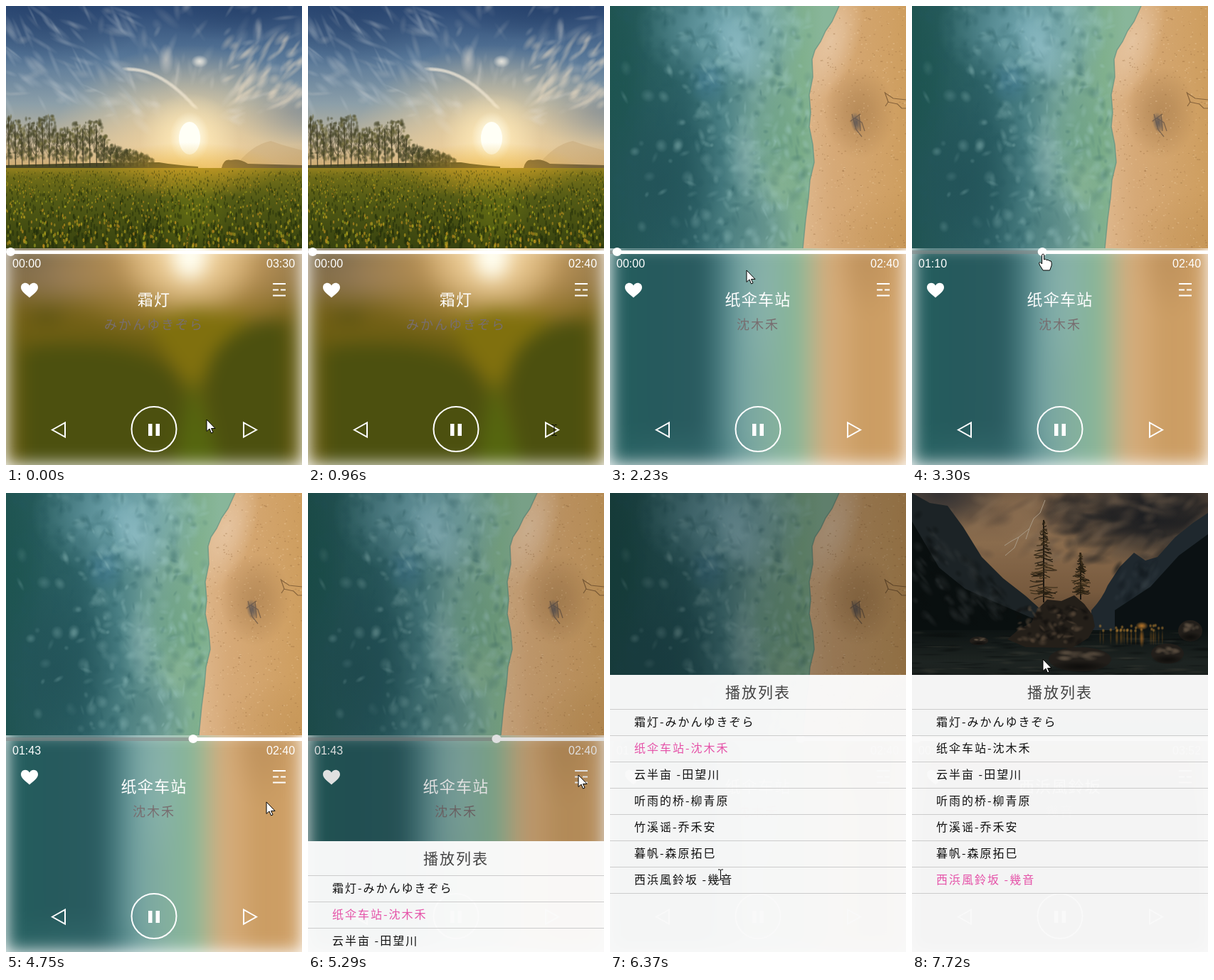
Animation, 416 px wide and 646 px high, one loop 8000 ms. Source, as an HTML page with a canvas:

```html
<!DOCTYPE html>
<html lang="zh">
<head>
<meta charset="utf-8">
<title>Music player</title>
<style>
html, body { margin: 0; width: 100%; height: 100%; overflow: hidden; background: #fff; }
#stage { position: relative; width: 416px; height: 646px; overflow: hidden;
  font-family: "Noto Sans CJK SC", "Noto Sans CJK", sans-serif; font-weight: 300; }
#stage > * { position: absolute; left: 0; top: 0; }
#stage > p { margin: 0; width: 416px; text-align: center; white-space: nowrap; line-height: 30px; }
#stage > .time { width: auto; color: #fff; font: 16px/20px Arial, "Liberation Sans", sans-serif; top: 353px; }
#now { left: 9px; }
#stage > #total { left: 366px; }
#stage > #title { top: 396px; color: #fff; font-size: 22px; letter-spacing: 1.2px; }
#stage > #artist { top: 432px; color: #786e70; font-size: 18px; letter-spacing: 2px; }
#dim { width: 416px; height: 646px; background: #000; }
#list { width: 416px; height: 390px; background: rgba(251, 251, 251, .967); color: #111; }
#list div { box-sizing: border-box; height: 37px; padding-left: 34px; border-bottom: 1px solid #ccc;
  font-size: 16px; line-height: 33px; letter-spacing: 2px; white-space: pre; }
#list .head { height: 49px; padding: 0; text-align: center; font-size: 21px; line-height: 46px; color: #444; }
#list .on { color: #e552a8; }
</style>
</head>
<body>
<div id="stage">
  <svg id="ui" width="416" height="646" fill="none" stroke="#fff" stroke-width="2">
    <path d="M0 346.5H416" stroke="#888" stroke-opacity=".55" stroke-width="5"/>
    <path id="rest" stroke-width="5"/>
    <ellipse id="thumb" cy="346" rx="6.5" ry="6" fill="#fff" stroke="none"/>
    <path d="M33 410.5C27 405 21 401.5 21 396C21 389 30 387.5 33 393.5C36 387.5 45 389 45 396C45 401.5 39 405 33 410.5Z" fill="#fff" stroke="none"/>
    <path d="M375 391H393M375 399.5H383M386 399.5H393M375 407.5H393"/>
    <path d="M65 596.5L83 586.5V606.500ZM352 596.500L334 586.500V606.500Z"/>
    <circle cx="208" cy="595.500" r="31.500"/>
    <path d="M200 588h5.500v17h-5.500zM210.500 588h5.500v17h-5.500z" fill="#fff" stroke="none"/>
  </svg>
  <p class="time" id="now"></p>
  <p class="time" id="total"></p>
  <p id="title"></p>
  <p id="artist"></p>
  <div id="dim"></div>
  <div id="list"><div class="head">播放列表</div></div>
  <svg width="416" height="646"><path id="cursor" stroke="#000" stroke-linejoin="round"/></svg>
</div>
<script>
const W = 416, H = 646, PHOTO = 341, TAU = Math.PI * 2;
const $ = id => document.getElementById(id);

const songs = [
  ['霜灯', 'みかんゆきぞら', '03:30'],
  ['纸伞车站', '沈木禾', '02:40'],
  ['云半亩 ', '田望川', '03:12'],
  ['听雨的桥', '柳青原', '03:48'],
  ['竹溪谣', '乔禾安', '04:05'],
  ['暮帆', '森原拓巳', '03:26'],
  ['西浜風鈴坂 ', '幾音', '03:52'],
];

// ---- drawing helpers, all on the current context g ----
let g, seed = 7;
const rnd = (a = 0, b = 1) => {
  seed = (seed * 16807) % 2147483647;
  return a + (b - a) * seed / 2147483647;
};
const newCanvas = () => Object.assign(document.createElement('canvas'), { width: W, height: H });
const stops = (gr, list) => { list.forEach(([p, c]) => gr.addColorStop(p, c)); return gr; };
const linear = (x0, y0, x1, y1, list) => stops(g.createLinearGradient(x0, y0, x1, y1), list);
const radial = (x, y, r, list) => stops(g.createRadialGradient(x, y, 0, x, y, r), list);
const rect = (x, y, w, h, fill) => { g.fillStyle = fill; g.fillRect(x, y, w, h); };
const shape = (d, fill) => { g.fillStyle = fill; g.fill(new Path2D(d)); };
const line = (d, color, width) => { g.strokeStyle = color; g.lineWidth = width; g.stroke(new Path2D(d)); };
const oval = (x, y, rx, ry, fill) => {
  g.fillStyle = fill; g.beginPath(); g.ellipse(x, y, rx, ry, 0, 0, TAU); g.fill();
};
function blob(x, y, rx, ry, rgb, a, turn = 0) {
  g.save();
  g.translate(x, y); g.rotate(turn); g.scale(rx, ry);
  rect(-1, -1, 2, 2, radial(0, 0, 1, [[0, `rgba(${rgb},${a})`], [.4, `rgba(${rgb},${a * .7})`], [1, `rgba(${rgb},0)`]]));
  g.restore();
}
const many = (n, f) => { for (let i = 0; i < n; i++) f(i); };

// ---- sunny field ----
function tree(x, h) {
  const y = 226;
  line(`M${x} ${y}L${x + rnd(-2, 2)} ${y - h * .9}`, 'rgba(56,52,34,.8)', 1.3);
  many(14, () => {
    const from = y - h * rnd(.2, .7), dx = rnd(-9, 9);
    line(`M${x} ${from}q${dx * .6} -4 ${dx} ${-h * rnd(.12, .3)}`, 'rgba(60,56,36,.5)', .7);
  });
  many(45, () => {
    const k = rnd(.15, 1), half = 11 * Math.sin(Math.PI * k ** .8 * .92) + 2;
    blob(x + rnd(-half, half), y - h * k, rnd(1.5, 4), rnd(2, 5), rnd() < .7 ? '66,66,36' : '105,100,50', .6);
  });
}
function field() {
  rect(0, 0, W, 230, linear(0, 0, 0, 230, [[0, '#2b4874'], [.3, '#557597'], [.6, '#8c9fa9'], [.85, '#c9b898'], [1, '#d2ab6c']]));
  blob(60, 20, 130, 70, '34,60,100', .45);
  blob(330, 5, 130, 45, '34,60,100', .5);
  blob(400, 150, 90, 45, '112,124,138', .6);
  blob(258, 185, 190, 130, '252,218,160', .8);
  many(170, () => {
    const a = rnd(-2.9, -.3), d = rnd(60, 290);
    blob(258 + d * Math.cos(a), 185 + d * Math.sin(a), rnd(8, 26), rnd(3, 8), '232,226,216', rnd(.06, .22), a + rnd(-.8, .8));
  });
  many(60, () => blob(rnd(0, 180), rnd(5, 140), rnd(10, 32), rnd(2, 6), '200,208,214', .22, rnd(.3, 1.2)));
  many(55, () => blob(rnd(310, 416), rnd(45, 140), rnd(8, 26), rnd(3, 8), '246,226,198', .32, rnd(-1.1, -.4)));
  many(14, i => blob(172 + i * 7, 89 + i * i * .3, 10, 3.5, '255,243,224', .6, .15 + i * .04));
  blob(272, 78, 12, 9, '255,248,235', .8);
  blob(225, 75, 11, 22, '235,225,212', .5);
  blob(258, 188, 70, 65, '255,236,188', .9);
  shape('M320 228Q345 195 372 190Q395 198 416 203V228Z', 'rgba(190,156,104,.35)');
  blob(258, 185, 28, 36, '255,255,240', 1);
  oval(258, 186, 15, 23, '#fffff6');
  shape('M303 228Q306 214 316 217Q328 214 340 222L416 224V229H303Z', '#75623a');
  shape('M0 232V224L120 221L215 220Q240 224 270 226V232Z', '#4a4826');
  many(21, i => tree(4 + i * 9.5, (i < 14 ? 70 : 45 - (i - 14) * 5) * rnd(.75, 1.08)));
  rect(0, 228, W, 114, linear(0, 228, 0, 341, [[0, '#93801f'], [.12, '#6f6c18'], [.4, '#525a15'], [1, '#38430f']]));
  blob(258, 232, 130, 40, '235,175,40', .5);
  blob(262, 290, 55, 70, '130,140,20', .35);
  many(2000, () => {
    const d = rnd() ** 1.4, y = 232 + d * 109, s = .6 + d * 1.7, x = rnd(0, W), bright = rnd() < .45;
    oval(x, y, s * (bright ? .7 : .7), s * (bright ? 1.3 : 2.2), bright ? `rgba(${rnd(150, 205)},${rnd(135, 168)},30,.65)` : 'rgba(32,44,10,.5)');
  });
}
function fieldBlur() {
  rect(0, 335, W, 311, linear(0, 341, 0, 480, [[0, '#7b6a4c'], [.35, '#7f6a40'], [.65, '#766218'], [1, '#685c10']]));
  blob(75, 385, 90, 40, '158,130,100', .55);
  blob(258, 345, 215, 130, '216,166,92', 1);
  blob(258, 348, 105, 95, '250,224,176', 1);
  oval(258, 352, 24, 32, '#fffef0');
  shape('M195 445L262 545L345 435L262 425Z', '#80700e');
  shape('M22 646V490Q28 472 130 478Q250 490 252 560L236 646Z', '#4c500f');
  shape('M396 646V445Q350 435 310 470Q276 500 280 555L300 646Z', '#4c500f');
  shape('M262 520L236 646H302Z', '#55660f');
  oval(56, 437, 26, 9, '#5c5312');
}

// ---- aerial shore ----
function shore() {
  rect(0, 0, W, PHOTO, linear(0, 0, 300, 0, [[0, '#1f5451'], [.35, '#2d6267'], [.52, '#487e83'], [.7, '#75a39b'], [.9, '#80b08d'], [1, '#88b69a']]));
  blob(160, 30, 125, 90, '122,174,184', .75);
  blob(70, 250, 105, 150, '34,82,88', .85);
  blob(15, 110, 40, 110, '28,84,80', .6);
  blob(138, 105, 30, 35, '66,122,148', .6);
  blob(235, 190, 60, 100, '104,158,122', .5);
  blob(190, 310, 70, 60, '72,122,122', .6);
  many(700, () => {
    const x = rnd(10, 280), light = rnd() < x / 360;
    blob(x, rnd(0, PHOTO), rnd(2, 11), rnd(3, 13), light ? '165,208,206' : '34,86,92', rnd(.1, .3), rnd(-.6, .6));
  });
  blob(180, 60, 32, 60, '170,212,222', .45, -.4);
  blob(190, 210, 22, 60, '160,196,196', .45);
  blob(240, 250, 30, 40, '150,190,150', .4);
  const edge = 'M322 0L312 22L303 35L296 50L288 62L284 75L285 100L280 125L282 150L280 170L285 195L287 220L281 245L279 270L275 300L271 341';
  g.save();
  g.clip(new Path2D(edge + 'H416V0Z'));
  rect(260, 0, 156, PHOTO, linear(270, 0, W, 0, [[0, '#deb78c'], [.3, '#d6a977'], [1, '#ce9e5f']]));
  blob(310, 50, 40, 90, '234,204,172', .75, .3);
  blob(350, 150, 50, 65, '165,122,74', .6);
  blob(400, 330, 100, 70, '190,142,80', .4);
  many(700, () => oval(rnd(275, W), rnd(0, PHOTO), rnd(.4, 1.6), rnd(.4, 1.1), rnd() < .5 ? 'rgba(140,98,54,.3)' : 'rgba(240,208,165,.35)'));
  line('M340 152l6 22l8 10M344 158l10 6l4 12M338 162l14 -10M350 152l2 24', 'rgba(100,82,68,.7)', 1.3);
  blob(346, 164, 8, 15, '92,86,86', .9, -.2);
  line('M386 121l5 14l-4 6M386 122l12 8l18 2M390 135l14 3l6 6l6 0', 'rgba(118,86,50,.8)', 1.2);
  g.restore();
  line(edge, 'rgba(95,145,130,.7)', 1.5);
}
function shoreBlur() {
  rect(0, 335, W, 311, linear(0, 0, W, 0, [[0, '#246060'], [.12, '#255a5c'], [.31, '#2a5b60'], [.37, '#477a7e'], [.44, '#75a3a2'], [.54, '#84af9f'], [.62, '#86b598'], [.67, '#a5b792'], [.71, '#cbae82'], [.76, '#d6ab78'], [.86, '#ca9c62'], [1, '#d0a168']]));
  blob(215, 400, 35, 130, '150,188,190', .35);
  blob(360, 350, 50, 90, '178,134,84', .5);
  blob(90, 640, 140, 50, '60,120,120', .4);
}

// ---- stormy lake ----
function spruce(x, top, bottom, half) {
  line(`M${x} ${top}V${bottom}`, '#2a2118', 2);
  many(110, () => {
    const k = rnd(), w = half * (.1 + .9 * Math.min(1, k * 1.5)) * rnd(.2, 1), side = rnd() < .5 ? -1 : 1;
    const y = top + (bottom - top - 8) * k;
    line(`M${x} ${y}q${side * w * .6} ${rnd(0, 4)} ${side * w} ${rnd(-1, 5)}`, rnd() < .6 ? '#372c1a' : '#5a4628', 1.2);
  });
}
function lake() {
  rect(0, 0, W, 200, linear(0, 0, 0, 200, [[0, '#a68362'], [.35, '#c59a6e'], [.7, '#aa8058'], [1, '#6c543e']]));
  blob(40, 0, 90, 55, '72,70,72', 1);
  blob(345, 25, 150, 85, '42,44,48', 1);
  blob(330, 35, 95, 50, '42,44,48', .8);
  blob(225, 25, 45, 35, '92,80,70', .8);
  blob(150, 30, 40, 40, '205,162,118', .6);
  many(110, () => blob(rnd(190, 416), rnd(0, 95), rnd(10, 32), rnd(5, 13), rnd() < .55 ? '40,42,46' : '150,126,102', .35, rnd(-.9, .3)));
  many(45, () => blob(rnd(30, 210), rnd(0, 90), rnd(10, 32), rnd(5, 12), rnd() < .5 ? '110,90,76' : '210,172,130', .25, rnd(-.9, .3)));
  line('M187 10L180 28L171 36L165 50L150 62L144 77L131 88M165 50L160 65M150 62L139 68L130 74', '#f0dcc0', 1);
  shape('M252 165Q268 148 275 130L292 104L312 84L328 95L345 90L370 62L395 42L416 28V200H252Z', '#2c3942');
  many(30, () => blob(rnd(285, 345), rnd(100, 150), rnd(3, 9), rnd(5, 16), rnd() < .5 ? '70,84,92' : '22,32,38', .4, .5));
  shape('M285 165L335 132L375 88L416 58V200H285Z', '#10191b');
  shape('M0 0L25 14L50 18L72 48L98 90L128 120L160 145L190 172V202H0Z', '#283236');
  shape('M0 40L38 105L75 135L120 155L178 180V205H0Z', '#0d1515');
  many(120, () => { const x = rnd(0, 135); blob(x, rnd(20 + x * .9, 180), rnd(3, 9), rnd(5, 18), rnd() < .6 ? '12,18,18' : '74,82,84', .35, -.7); });
  rect(0, 193, W, 150, linear(0, 193, 0, 341, [[0, '#131c1b'], [.3, '#2a3330'], [1, '#121919']]));
  many(140, () => blob(rnd(0, W), rnd(196, 260), rnd(10, 32), rnd(1, 3), rnd() < .4 ? '78,80, 70' : '10,15,15', .4));
  many(24, () => { const x = rnd(258, 360); blob(x, 190 + rnd(-4, 4), 2.5, 3, '255,180,70', .7); blob(x, 203, 1.5, 12, '180,120,40', .4); });
  blob(323, 187, 9, 6, '255,165,60', 1);
  blob(323, 204, 4, 14, '230,145,50', .7);
  shape('M134 206L150 192L168 182L176 164L190 150L210 152L228 144L242 156L254 172L257 188L248 204L225 218L160 217Z', '#332c24');
  many(90, () => blob(rnd(150, 246), rnd(158, 212), rnd(3, 9), rnd(2, 6), rnd() < .55 ? '20,18,16' : '142,116,90', .5, rnd(-1, 1)));
  spruce(185, 38, 154, 20);
  spruce(237, 84, 150, 14);
  [[236, 234, 44, 17], [359, 226, 23, 14], [391, 194, 17, 15], [94, 208, 13, 6]].forEach(([x, y, rx, ry]) => {
    oval(x, y, rx, ry, '#302b25');
    many(14, () => blob(x + rnd(-.6, .6) * rx, y - rnd(0, .6) * ry, rx * .25, ry * .25, '140,120,98', .5));
    blob(x, y + ry * .6, rx, ry * .5, '14,14,12', .8);
  });
}
const lakeBlur = () => rect(0, 335, W, 311, linear(0, 335, 0, H, [[0, '#5b4d3e'], [.4, '#2c302e'], [1, '#141c1d']]));

function scene(photo, panel) {
  const blurred = newCanvas(), page = newCanvas();
  g = blurred.getContext('2d');
  g.beginPath(); g.rect(0, 335, W, 311); g.clip();
  panel();
  g = page.getContext('2d');
  rect(0, 0, W, H, '#fff');
  g.filter = 'blur(12px)';
  g.drawImage(blurred, 0, 0);
  g.filter = 'none';
  g.beginPath(); g.rect(0, 0, W, PHOTO); g.clip();
  photo();
  $('stage').insertBefore(page, $('ui'));
  return page;
}
const pages = { 0: scene(field, fieldBlur), 1: scene(shore, shoreBlur), 6: scene(lake, lakeBlur) };

const rows = songs.map(([title, artist]) => {
  const row = document.createElement('div');
  row.textContent = `${title}-${artist}`;
  return $('list').appendChild(row);
});

// ---- timeline ----
const LOOP = 8000, NEXT = 1250, PICK = 6920, OPEN = 5200;
const path = [[150, 282, 582], [690, 346, 597], [1300, 346, 597], [2230, 192, 372], [2740, 184, 349],
  [3300, 184, 349], [3840, 263, 349], [4200, 263, 349], [4500, 332, 549], [4750, 366, 435],
  [5140, 376, 398], [5440, 384, 396], [5600, 384, 396], [6250, 155.5, 537.5], [7020, 155.5, 537.5], [7720, 184, 234]];
const slide = [[3020, 183], [3300, 183], [3840, 259], [4750, 263], [5600, 266], [PICK, 269]];
const pointers = {
  arrow: ['M0 0V16.5L4 13L6.5 19L9 18L6.5 12.5H12Z', '#fff'],
  hand: ['M-1.5 1Q0 -1 1.5 1V8Q3.5 6.5 5 8.5Q7 7.5 8.5 9.5Q12 9 12 12.5V16L9.5 23H0L-5 15Q-6.5 11.5 -4 11.5L-1.5 14Z', '#fff'],
  beam: ['M-3.5 -7.5H-1L0 -6.5L1 -7.5H3.5M0 -6.5V6.5M-3.5 7.5H-1L0 6.5L1 7.5H3.5', 'none'],
};

function at(keys, t) {
  const i = keys.findIndex(k => k[0] > t);
  if (i < 0) return keys[keys.length - 1].slice(1);
  if (!i) return keys[0].slice(1);
  const a = keys[i - 1], b = keys[i], u = (t - a[0]) / (b[0] - a[0]);
  return a.slice(1).map((v, k) => v + (b[k + 1] - v) * u);
}
const clock = s => [s / 60, s % 60].map(v => String(Math.floor(v)).padStart(2, '0')).join(':');
const between = (t, a, b) => t >= a && t < b;

function frame() {
  const t = performance.now() % LOOP;
  const song = t < NEXT ? 0 : t < PICK ? 1 : 6;
  for (const k in pages) pages[k].style.visibility = +k === song ? 'visible' : 'hidden';

  const x = song !== 1 ? 6.5 : t < 3020 ? 10 : at(slide, t)[0];
  $('thumb').setAttribute('cx', x);
  $('rest').setAttribute('d', `M${x} 346.5H416`);
  $('now').textContent = clock(Math.max(0, 70 + (x - 183) * .4125));
  $('total').textContent = songs[between(t, 960, NEXT) ? 1 : song][2];
  $('title').textContent = songs[song][0].trim();
  $('artist').textContent = songs[song][1];

  const u = Math.min(1, Math.max(0, (t - OPEN) / 580)), open = 1 - (1 - u) ** 3;
  $('dim').style.opacity = .3 * open;
  $('list').style.top = H - 390 * open + 'px';
  rows.forEach((row, i) => row.classList.toggle('on', i === song));

  const [cx, cy] = at(path, t);
  const kind = between(t, 690, 1330) || between(t, 6250, 7050) ? 'beam' : between(t, 2700, 4240) ? 'hand' : 'arrow';
  const [d, fill] = pointers[kind], cursor = $('cursor');
  cursor.setAttribute('d', d);
  cursor.setAttribute('fill', fill);
  cursor.setAttribute('transform', `translate(${cx} ${cy})`);
  requestAnimationFrame(frame);
}
frame();
</script>
</body>
</html>
```
